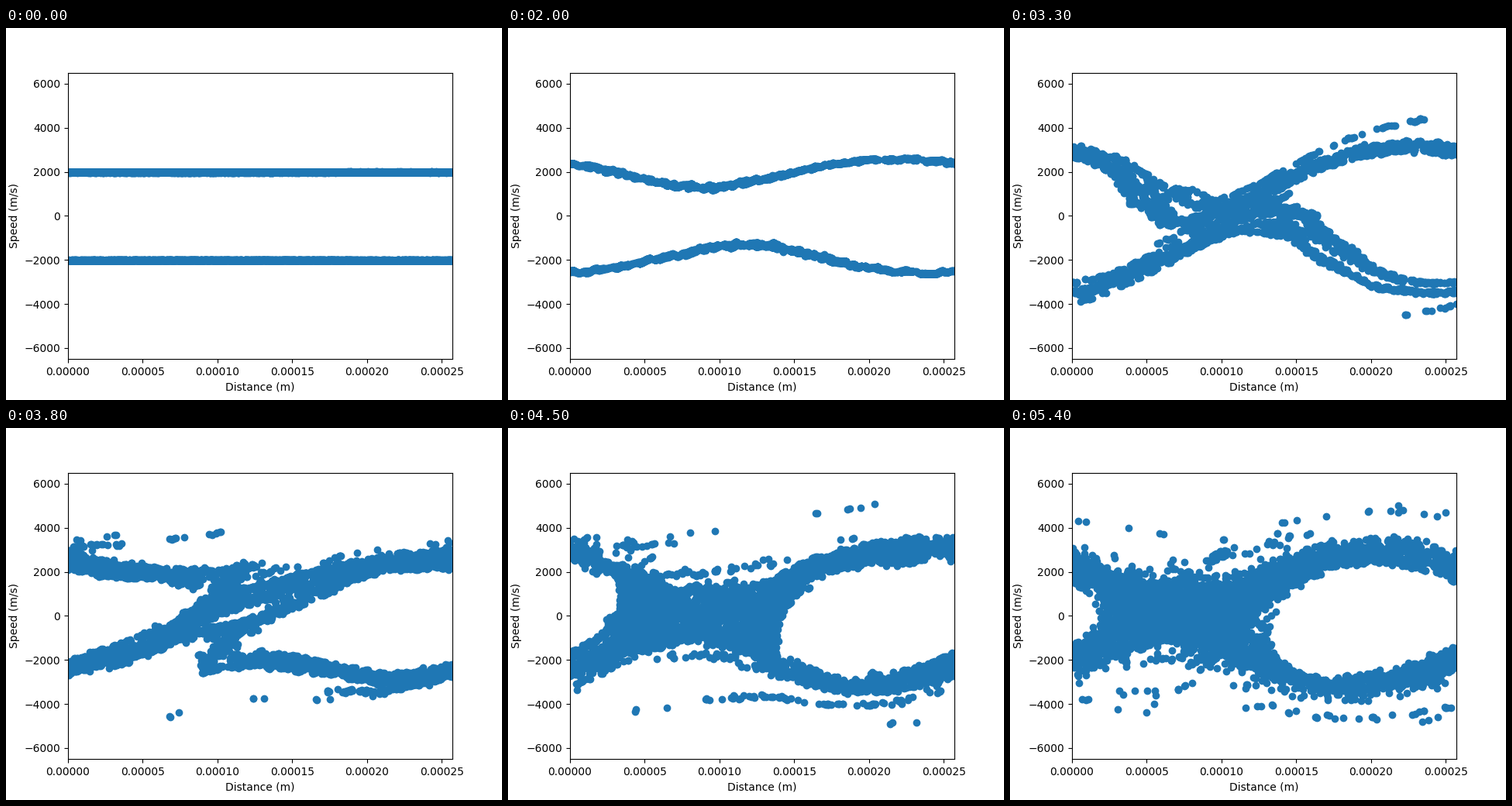
A matplotlib script that plays this animation: 640 by 480 pixels, repeating every 5.5 s.

```python
"""Two-stream instability: phase space of two cold counter-streaming beams."""
import numpy as np
import matplotlib.pyplot as plt
from matplotlib.animation import FuncAnimation

BEAM_SPEED = 2000        # m/s
LENGTH = 2.572e-4        # m, one wavelength of the unstable mode
PER_BEAM = 2500
MODES = 12
TICKS, TICK_MS = 55, 100
SUBSTEPS = 10
STEP = 1.08 / SUBSTEPS   # in inverse plasma frequencies

# Dimensionless units: box length 2 pi, plasma frequency 1
DRIFT = np.sqrt(3) / 2
GROWTH = np.sqrt((np.sqrt(7) - 2.5) / 2)
TO_SPEED = BEAM_SPEED / DRIFT
PHASE = np.radians(228)
SEED_SPEED = 2.5         # m/s

rng = np.random.default_rng(4)


def load_beam(sign):
    """Evenly spaced beam carrying the growing linear mode."""
    angle = (np.arange(PER_BEAM) + 0.5) * 2 * np.pi / PER_BEAM
    rate = GROWTH + 1j * sign * DRIFT
    force = SEED_SPEED / TO_SPEED * abs(rate)
    kick = force * np.exp(1j * (angle - PHASE)) / rate
    return angle + (kick / rate).real, sign * DRIFT + kick.real


def field(x):
    """Acceleration from the first Fourier modes of the charge density."""
    z = np.exp(1j * x)
    wave = np.ones_like(z)
    total = np.zeros_like(x)
    for m in range(1, MODES + 1):
        wave = wave * z
        total += 2 / m * (np.conj(wave.mean()) * wave).imag
    return total


def ripple(x, size):
    """Short-wave grid noise, size in m/s."""
    total = np.zeros_like(x)
    for m in rng.integers(20, 46, 4):
        total += np.sin(m * x + rng.uniform(0, 2 * np.pi))
    return size / TO_SPEED * total / np.sqrt(2)


def simulate(count):
    beams = [load_beam(sign) for sign in (1, -1)]
    x, v = (np.concatenate(part) for part in zip(*beams))
    spread = rng.uniform(0, 36, x.size) / TO_SPEED
    states = [(x.copy(), v - spread)]
    for n in range(1, count):
        for _ in range(SUBSTEPS):
            x = x + v * STEP / 2
            v = v + field(x) * STEP
            x = x + v * STEP / 2
        v = v + ripple(x, 3 + 0.6 * n)
        states.append((x, v))
    return [(x % (2 * np.pi) * LENGTH / (2 * np.pi), v * TO_SPEED)
            for x, v in states]


states = simulate(TICKS - 1)

fig, ax = plt.subplots(figsize=(6.4, 4.8), dpi=100)
ax.set_xlim(0, LENGTH)
ax.set_ylim(-6500, 6500)
ax.set_xlabel("Distance (m)")
ax.set_ylabel("Speed (m/s)")
dots, = ax.plot([], [], "o", color="#1f77b4")


def draw(tick):
    # The opening state is held for two ticks
    dots.set_data(*states[max(0, tick - 1)])
    return dots,


anim = FuncAnimation(fig, draw, frames=TICKS, interval=TICK_MS,
                     init_func=lambda: draw(0), repeat=True)
plt.show()
```
